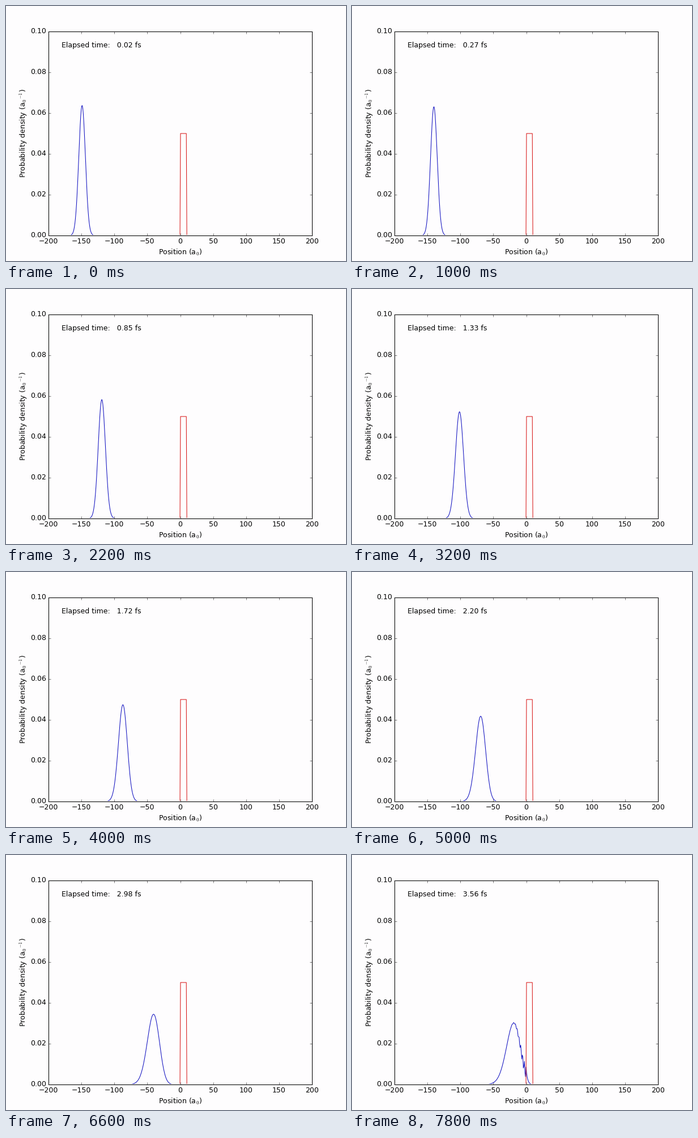
A matplotlib script that plays this animation: 600 px wide and 450 px high, repeating every 8 s.

```python
import numpy as np
import matplotlib.pyplot as plt
from matplotlib.animation import FuncAnimation
from matplotlib.transforms import Bbox

plt.rcParams.update({
    "font.family": "DejaVu Sans",
    "font.size": 12,
    "mathtext.fontset": "cm",
    "text.hinting": "auto",
    "text.kerning_factor": 6,
    "figure.dpi": 75,
    "savefig.dpi": 75,
    "axes.linewidth": 1.0,
    "lines.linewidth": 1.0,
})

FRAMES, INTERVAL = 40, 200
FS_PER_AU = 0.0241888
PAPER, BLUE, RED = "#fefdfe", "#1212c0", "#d81616"

# Grid, barrier and starting packet, all in atomic units
N = 500
DX, DT = 0.8, 0.5
X = np.linspace(-200, 200, N)
BARRIER = np.where((X >= 0) & (X < 10), 0.5, 0.0)
START, SIGMA, K0 = -150, 5.0, 1.0


def solve():
    """Eigenstates, Crank-Nicolson frequencies and packet coefficients."""
    hop = np.full(N - 1, -0.5 / DX ** 2)
    ham = np.diag(BARRIER + 1 / DX ** 2) + np.diag(hop, 1) + np.diag(hop, -1)
    energy, states = np.linalg.eigh(ham)
    grid = -200 + DX * np.arange(N)
    psi = np.exp(-((grid - START) / (2 * SIGMA)) ** 2 + 1j * K0 * grid)
    psi /= np.linalg.norm(psi)
    omega = 2 / DT * np.arctan(energy * DT / 2)
    return states, omega, states.T @ psi


STATES, OMEGA, COEFFS = solve()


def clock(n):
    """Time in atomic units: two per frame at first, then four."""
    return 1 + 2 * n if n <= 5 else 4 * n - 9


def density(t):
    return np.abs(STATES @ (COEFFS * np.exp(-1j * OMEGA * t))) ** 2


fig = plt.figure(figsize=(8, 6), dpi=75, facecolor=PAPER)
ax = fig.add_axes([0.125, 0.1, 0.775, 0.8], facecolor=PAPER)
ax.set_xlim(-200, 200)
ax.set_ylim(0, 0.1)
ax.set_xticks(np.arange(-200, 201, 50))
ax.set_yticks(np.arange(0, 0.11, 0.02))
ax.yaxis.set_major_formatter("{x:.2f}")
ax.tick_params(direction="in", top=True, right=True, length=4, width=0.5, pad=4)
for label in ax.get_yticklabels():
    label.set_va("center")
ax.set_xlabel("Position (a$_0$)", labelpad=4.1)
ax.set_ylabel("Probability density (a$_0$$^{-1}$)", labelpad=2.8)

wave, = ax.plot(X, density(clock(0)), color=BLUE)
wall, = ax.plot(X, BARRIER / 10, color=RED)
# Keep the flat parts of both lines from tinting the bottom axis
for line in (wave, wall):
    line.set_clip_box(Bbox.from_extents(75, 46, 540, 405))
timer = ax.text(0.05, 0.9225, "", transform=ax.transAxes)


def draw(n):
    t = clock(n)
    wave.set_ydata(density(t))
    timer.set_text(f"Elapsed time: {t * FS_PER_AU:6.2f} fs")
    return wave, timer


anim = FuncAnimation(fig, draw, frames=FRAMES, interval=INTERVAL,
                     repeat=True, repeat_delay=0, blit=False)
plt.show()
```
